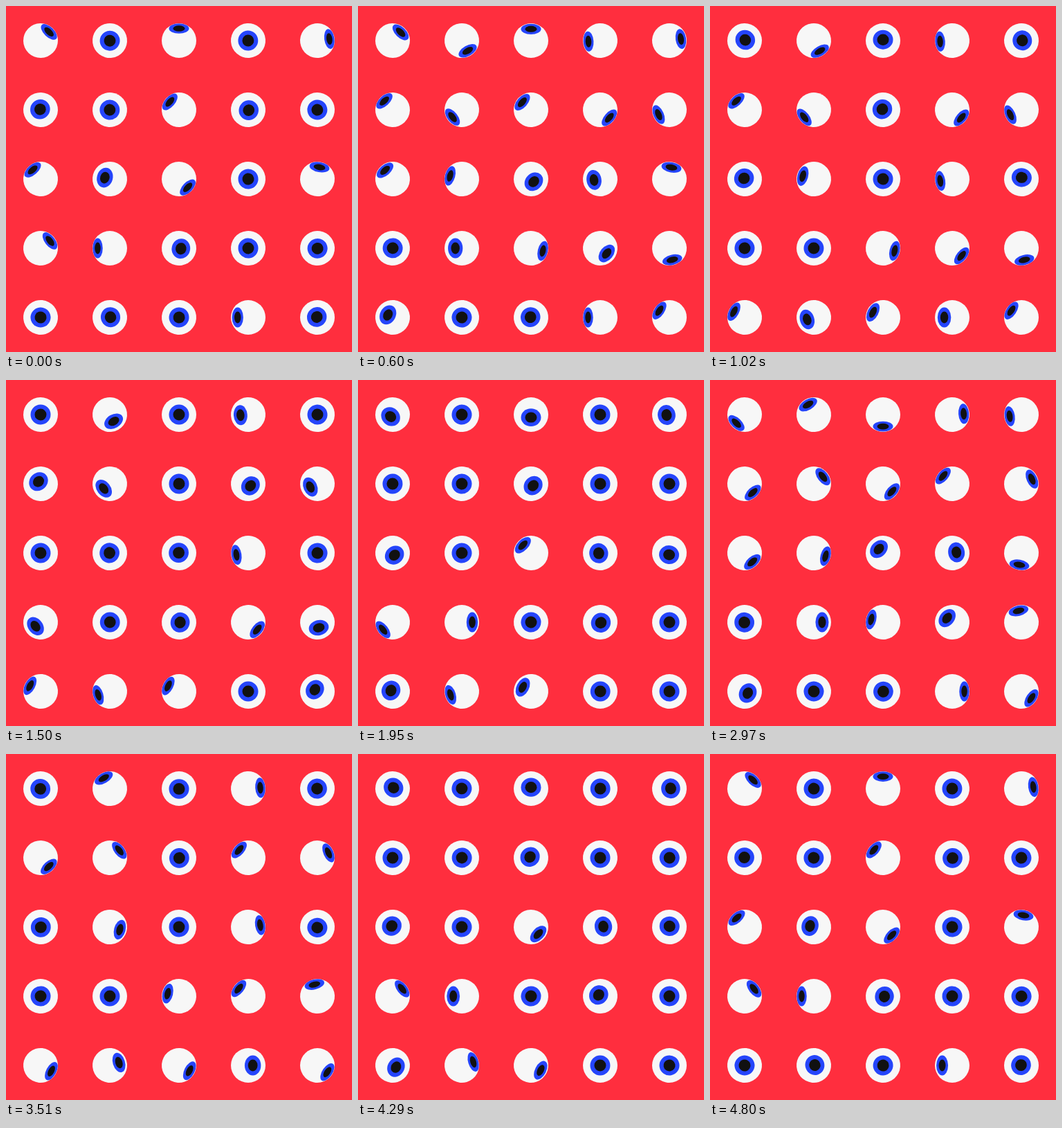
An HTML page with a canvas for the animation above (4830 ms loop, 500 by 500 pixels).

```html
<!DOCTYPE html>
<html>
<head>
<meta charset="utf-8">
<style>
html, body { margin: 0; height: 100%; overflow: hidden; background: #ff2e3e; }
canvas { display: block; }
</style>
</head>
<body>
<canvas id="stage" width="500" height="500"></canvas>
<script>
const ctx = document.getElementById('stage').getContext('2d');
const LOOP = 4830, QUARTER = LOOP / 4;
const REACH = 17.5, IRIS = 14.5, PUPIL = 8.5;
const EARLY = 225, MIDDLE = 820, LATE = 935;

// One key pose per eye, row by row: [gaze direction in degrees, time of furthest gaze in ms]
const keyPoses = [
  [-46, EARLY], [60, LATE], [-90, EARLY], [176, LATE], [-8, EARLY],
  [-133, MIDDLE], [142, LATE], [-139, EARLY], [41, MIDDLE], [156, LATE],
  [-131, EARLY], [-165, 625], [44, -55], [171, 1200], [-80, 270],
  [-38, -320], [180, 5], [13, 725], [39, 1150], [76, 890],
  [-152, 1220], [163, 1605], [-153, 1430], [180, 460], [-146, MIDDLE]
];

const ease = x => x < 0.5 ? 16 * x ** 5 : 1 - 16 * (1 - x) ** 5;

// Eased quarter steps: out, centre, opposite side, centre
function gaze(time) {
  const phase = ((time / QUARTER) % 4 + 4) % 4;
  const step = Math.floor(phase);
  const level = n => Math.cos(n * Math.PI / 2);
  return level(step) + (level(step + 1) - level(step)) * ease(phase - step);
}

function disc(x, rx, ry, color) {
  ctx.fillStyle = color;
  ctx.beginPath();
  ctx.ellipse(x, 0, rx, ry, 0, 0, 2 * Math.PI);
  ctx.fill();
}

function drawEye(x, y, angle, look) {
  const squash = 1 - Math.abs(look) / 2;
  ctx.save();
  ctx.translate(x, y);
  ctx.rotate(angle * Math.PI / 180);
  disc(0, 25, 25, '#f7f7f7');
  disc(look * REACH, IRIS * squash, IRIS, '#2545fb');
  disc(look * REACH, PUPIL * squash, PUPIL, '#111');
  ctx.restore();
}

function draw() {
  const time = performance.now() % LOOP;
  ctx.fillStyle = '#ff2e3e';
  ctx.fillRect(0, 0, 500, 500);
  keyPoses.forEach(([angle, peak], i) =>
    drawEye(50 + i % 5 * 100, 50 + Math.floor(i / 5) * 100, angle, gaze(time - peak)));
  requestAnimationFrame(draw);
}
draw();
</script>
</body>
</html>
```
